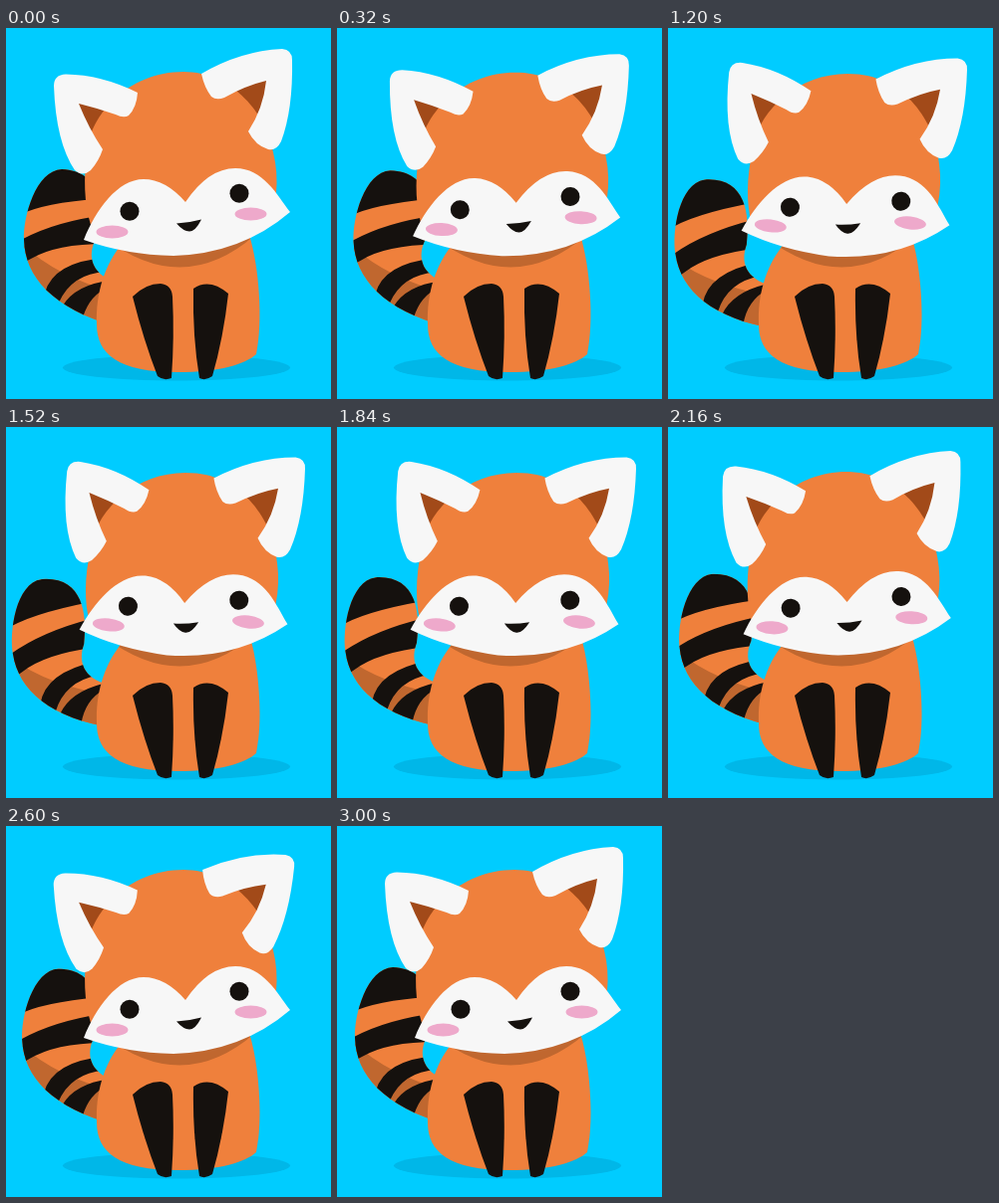
Animation of 326x373 px, one loop 3040 ms. Source, as an HTML page:

```html
<!DOCTYPE html>
<html lang="en">
<head>
<meta charset="utf-8">
<title>Red panda</title>
<style>
  html, body { margin: 0; width: 100%; height: 100%; overflow: hidden; background: #00ccff; }
  svg { display: block; width: 326px; height: 373px; }
  .fur { fill: #ef803c; }
  .shade { fill: #c0672f; }
  .dark { fill: #15110e; }
  .white { fill: #f7f7f7; }
  .inner { fill: #a24a19; }
  .cheek { fill: #eea9cb; }
</style>
</head>
<body>
<svg viewBox="0 0 326 373">
  <defs>
    <path id="tailShape" d="M56 142C30 143 17 190 18 213C19 250 47 282 110 300V256C84 246 82 228 90 212C98 180 96 144 56 142Z"/>
    <path id="bodyShape" d="M118 215C99 237 90 266 91 298C91 328 113 346 172 346C215 346 240 338 251 328C258 295 254 240 244 208Z"/>
    <clipPath id="tailClip"><use href="#tailShape"/></clipPath>
    <clipPath id="bodyClip"><use href="#bodyShape"/></clipPath>
  </defs>

  <ellipse cx="171" cy="341.5" rx="114" ry="13" fill="#00b7e8"/>

  <g id="tail">
    <use href="#tailShape" class="fur"/>
    <g clip-path="url(#tailClip)">
      <path class="shade" d="M15 216Q50 250 110 266V310H15Z"/>
      <path class="dark" d="M0 130H120V170Q50 173 20 185L0 191Z
        M10 216Q45 195 100 188V217Q50 217 25 232L10 240Z
        M39 266Q48 235 100 231V245Q66 247 53 276Z
        M57 279Q70 258 104 254V260Q84 268 77 291Z"/>
    </g>
  </g>

  <use href="#bodyShape" class="fur"/>
  <path class="shade" clip-path="url(#bodyClip)" d="M100 212Q178 271 250 208Z"/>
  <path class="dark" d="M127 270Q140 257 155 257Q166 258 167 270Q169 310 166 352Q158 355 152 350Q138 314 127 270Z
    M188 262Q204 251 223 267Q218 312 207 350Q200 355 194 352Q187 310 188 262Z"/>

  <g id="head">
    <path class="inner ear-left" d="M60 60L122 80L85 135Z"/>
    <path class="inner ear-right" d="M276 38L212 66L258 115Z"/>
    <path class="fur" d="M85 198C78 175 78 150 81 125C84 88 122 44 178 44C228 44 262 88 268 125Q273 145 271 166L180 200Z"/>
    <path class="white ear-left" d="M132 65Q96 47 60 46.500Q48 47 48 58Q50 115 69 143Q77 150 85 143Q93 134 97 122Q83 101 73 76Q93 81 110 87Q118 91 123 88Q131 80 132 65Z"/>
    <path class="white ear-right" d="M196 46Q235 23 277 21Q287 22 287 32Q288 82 276 114Q271 124 263 122Q250 118 243 104Q258 81 261 53Q240 58 219 70Q211 73 206 69Q199 60 196 46Z"/>
    <path class="white" d="M78 213C90 183 112 152 138 152Q160 152 180 175Q203 141 230 141C258 141 272 168 285 185Q236 227 168 229Q120 228 78 213Z"/>
    <ellipse class="cheek" cx="106.500" cy="205" rx="16" ry="6.500"/>
    <ellipse class="cheek" cx="245.500" cy="187" rx="16" ry="6.500"/>
    <ellipse class="dark eye" cx="124" cy="184.300" rx="9.500" ry="9.500"/>
    <ellipse class="dark eye" cx="234" cy="166.300" rx="9.500" ry="9.500"/>
    <path class="dark" d="M171 196.500Q183 196 196 192.500Q190 204.500 184 204.500Q178 204.500 171 196.500Z"/>
  </g>
</svg>
<script>
  const LOOP = 3040;
  const all = selector => document.querySelectorAll(selector);

  // Each track lists [time in ms, value] pairs, eased between neighbours.
  const tracks = {
    tail: [[0, 0], [1430, -7.4], [3000, 0]],
    head: [[100, 0], [600, 6.2], [1900, 6.2], [2440, 0]],
    earLeft: [[300, 0], [640, -5], [960, 1.8], [2320, 1.8], [2580, -1.2], [2840, 0]],
    earRight: [[300, 0], [640, 5], [960, -3.4], [2320, -3.4], [2580, 7], [2840, 0]],
    eye: [[2800, 1], [2890, 0.1], [2980, 1]]
  };

  function valueAt(track, t) {
    const i = track.findIndex(([time]) => time > t);
    if (i < 0) return track[track.length - 1][1];
    if (i === 0) return track[0][1];
    const [t0, a] = track[i - 1], [t1, b] = track[i];
    return a + (b - a) * (1 - Math.cos(Math.PI * (t - t0) / (t1 - t0))) / 2;
  }

  function rotate(selector, angle, x, y) {
    all(selector).forEach(el => el.setAttribute('transform', `rotate(${angle} ${x} ${y})`));
  }

  function draw(now) {
    const t = now % LOOP;
    rotate('#tail', valueAt(tracks.tail, t), 132, 307);
    rotate('#head', valueAt(tracks.head, t), 161, 168);
    rotate('.ear-left', valueAt(tracks.earLeft, t), 108, 72);
    rotate('.ear-right', valueAt(tracks.earRight, t), 213, 54);
    all('.eye').forEach(el => el.setAttribute('ry', 9.5 * valueAt(tracks.eye, t)));
  }

  let start;
  function tick(now) {
    start ??= now;
    draw(now - start);
    requestAnimationFrame(tick);
  }
  draw(0);
  requestAnimationFrame(tick);
</script>
</body>
</html>
```
